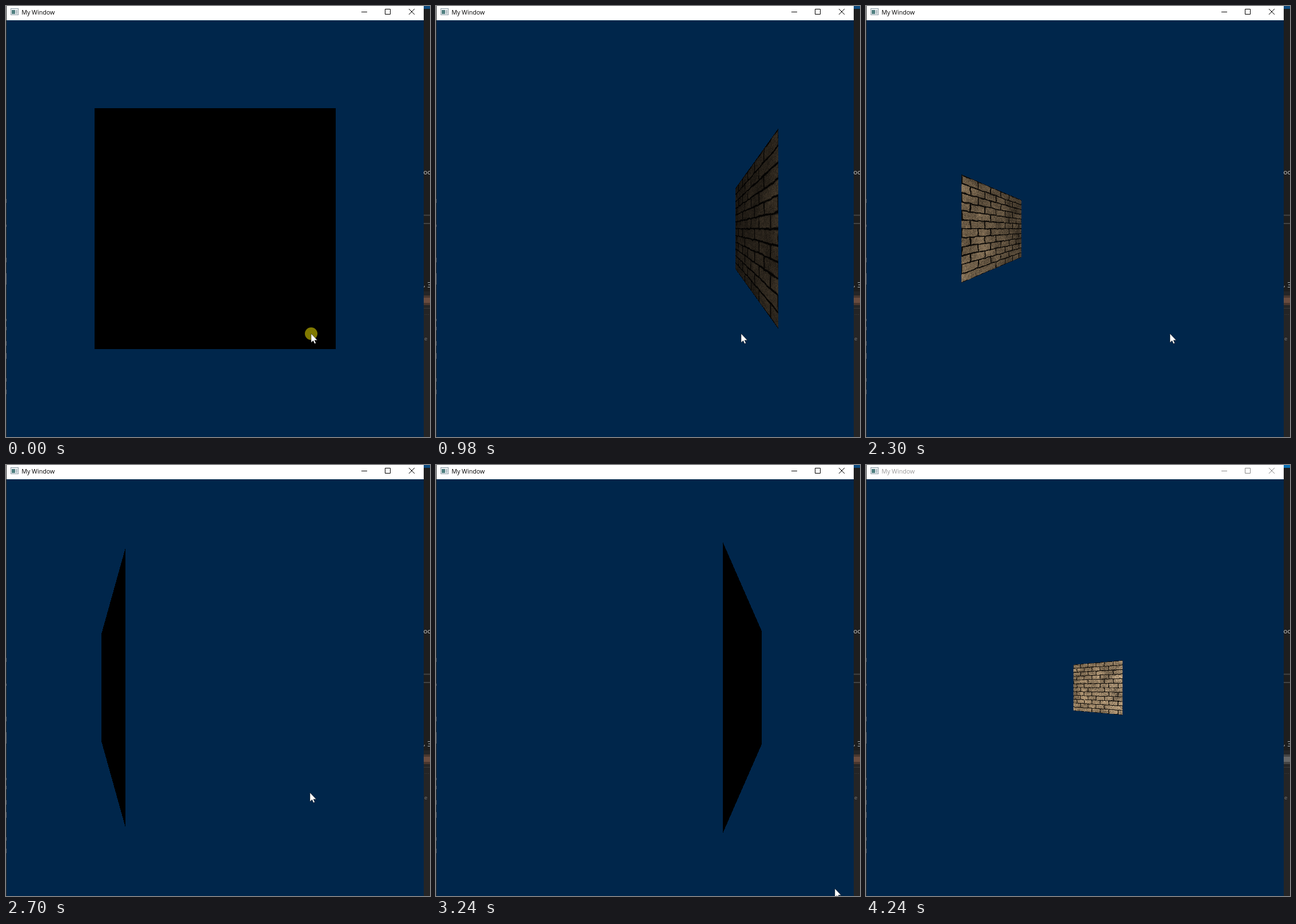
An HTML page with a canvas that plays this animation: 742 by 755 pixels, repeating every 4320 ms.

```html
<!DOCTYPE html>
<html lang="en">
<head>
<meta charset="utf-8">
<title>Rotating wall</title>
<style>
  html, body { margin: 0; width: 100%; height: 100%; overflow: hidden; background: #1e1e1e; }
  svg, canvas { position: absolute; left: 0; top: 0; width: 742px; height: 755px; display: block; }
  text { font-family: "Open Sans", "Noto Sans", sans-serif; }
</style>
</head>
<body>
<svg viewBox="0 0 742 755">
  <rect width="742" height="755" fill="#1e1e1e"/>
  <g id="desk">
    <rect id="deskTop" x="731" width="11" height="5"/>
    <text x="730.5" y="295" font-size="11.5" fill="#d0d0d0">oc</text>
    <path d="M731 366.5h11M731 381h11" stroke="#434343" stroke-width="2"/>
    <text x="731" y="492" font-size="11.5" fill="#c4c4c4">,</text>
    <path d="M738 484.5h4M739 488.5h3M738 492.5h4" stroke="#a8b0b4"/>
    <rect x="731" y="500" width="11" height="255" fill="#252526"/>
    <rect id="barOuter" x="731" y="507" width="11" height="17"/>
    <rect id="barInner" x="731" y="511" width="11" height="9"/>
    <path d="M731 529.5h11" stroke="#3a3a3a"/>
    <path d="M733 540.5h9" stroke="#444" stroke-dasharray="1 2"/>
    <text x="732" y="586" font-size="9.5" fill="#777">e</text>
  </g>
  <rect width="1" height="755" fill="#2a2b2d"/>
  <path d="M.5 338v7M.5 383v4M.5 441v8M.5 468v20M.5 548v4M.5 562v6M.5 587v8M.5 608v10M.5 652v6M.5 672v8" stroke="#66605a"/>
  <rect x="1" width="730" height="25" fill="#fff"/>
  <rect x="1" y="25" width="730" height="730" fill="#00264b"/>
  <g>
    <rect x="8.5" y="4.5" width="13" height="11" fill="#f4f7f8" stroke="#8c9ba5"/>
    <rect x="10" y="7" width="6" height="7" fill="#4f7f80"/>
    <rect x="17" y="7" width="3" height="7" fill="#b9c4cb"/>
  </g>
  <text id="title" x="27.3" y="14.6" font-size="10.7">My Window</text>
  <path id="buttons" fill="none" d="M622 10.5h10M663.5 5.5h9v9h-9zM705 5l10 10M715 5l-10 10"/>
</svg>
<canvas id="view" width="742" height="755"></canvas>
<svg viewBox="0 0 742 755">
  <circle id="click" cx="534" cy="574" r="11" fill="#fff200" fill-opacity=".5"/>
  <path id="cursor" d="M0 0V15.6L3.6 12.2L6 17.6L8.4 16.5L6 11.4H10.8Z" fill="#fff" stroke="#111" stroke-width=".5"/>
</svg>
<script>
const LOOP = 4320;
const CX = 366, CY = 390;
const FOCAL = 365 / Math.tan(Math.PI / 3);   // 120 degree field of view
const DIST = 3, ORBIT = 2;
const TEX = 384, ROWS = 12;

const $ = id => document.getElementById(id);
const ctx = $('view').getContext('2d');

// start ms, end ms, steps, first angle, last angle
const runs = [
  [0, 0, 1, 0, 0],
  [70, 70, 1, 2.5, 2.5],
  [200, 200, 1, 5.74, 5.74],
  [750, 1210, 7, 22.8, 103.2],
  [1290, 1760, 7, 114, 183.3],
  [1840, 2300, 7, 195, 263.7],
  [2390, 2860, 7, 274.3, 338.2],
  [2930, 3390, 7, 355.3, 423],
  [3460, 3640, 3, 435, 459],
  [3710, 3930, 4, 469, 498.4],
  [4010, 4090, 2, 507, 515.4]
];
const poses = runs.flatMap(([t0, t1, n, a0, a1]) =>
  Array.from({ length: n }, (_, i) => {
    const k = n > 1 ? i / (n - 1) : 0;
    return [Math.round((t0 + (t1 - t0) * k) / 10) * 10, a0 + (a1 - a0) * k];
  }));

const cursorPath = [
  [0, 534, 574], [1290, 533, 574], [1840, 532, 574], [2780, 531, 576],
  [2930, 529, 579], [3010, 528, 582], [3080, 560, 620], [3160, 630, 690],
  [3240, 698, 742], [3310, 760, 780]
];

const latest = (list, t) => list.findLast(e => e[0] <= t);

function hash(x, y) {
  let h = Math.imul(x, 374761393) + Math.imul(y, 668265263);
  h = Math.imul(h ^ (h >>> 13), 1274126177);
  return ((h ^ (h >>> 16)) >>> 0) / 4294967296;
}

function smoothNoise(x, y) {
  const i = Math.floor(x), j = Math.floor(y);
  const ease = v => v * v * (3 - 2 * v);
  const u = ease(x - i), v = ease(y - j);
  const top = hash(i, j) * (1 - u) + hash(i + 1, j) * u;
  const low = hash(i, j + 1) * (1 - u) + hash(i + 1, j + 1) * u;
  return top * (1 - v) + low * v;
}

// Brightness of the brick wall, 1 being plain stone
function makeWall() {
  const wall = new Float32Array(TEX * TEX);
  const h = TEX / ROWS, w = TEX / 6;
  for (let y = 0; y < TEX; y++) for (let x = 0; x < TEX; x++) {
    const wy = y + (smoothNoise(x / 14, y / 14 + 50) - .5) * 4;
    const row = Math.floor(wy / h);
    const wx = x + (row & 1 ? w / 2 : 0) + (smoothNoise(x / 14 + 90, y / 14) - .5) * 4;
    const col = Math.round(wx / w);
    const dy = Math.abs(wy - Math.round(wy / h) * h);
    const joint = hash(col + 31, row + 7) > .17;
    const dx = joint ? Math.abs(wx - col * w) : 99;
    const brick = hash(Math.floor(wx / w) + 5, row + 60);
    const gap = Math.min(dx, dy);
    let b = .72 + .14 * brick + .38 * smoothNoise(x / 42 + 3, y / 42)
          + .22 * (smoothNoise(x / 6, y / 6) - .5) + .42 * (hash(x, y) - .5);
    b += .1 * (y / TEX - x / TEX);
    if (gap < 1.9) b *= .13;
    else if (gap < 3.2) b *= .62;
    wall[y * TEX + x] = b;
  }
  return wall;
}
const wall = makeWall();

function drawWall(deg) {
  const s = Math.sin(deg * Math.PI / 180), c = Math.cos(deg * Math.PI / 180);
  const edge = a => {
    const z = DIST - ORBIT * c + a * s;
    return CX + FOCAL * (ORBIT * s + a * c) / z;
  };
  const xs = [edge(-1), edge(1)].sort((a, b) => a - b);
  const x0 = Math.round(xs[0]), x1 = Math.round(xs[1]);
  ctx.clearRect(0, 0, 742, 755);
  if (x1 <= x0) return;
  const top = 100, height = 580;
  const img = ctx.createImageData(x1 - x0, height), px = img.data;
  const facing = Math.max(0, ORBIT - DIST * c);   // plane distance to the lamp at the eye
  for (let x = x0; x < x1; x++) {
    const u = (x + .5 - CX) / FOCAL;
    const a = Math.max(-1, Math.min(1, (u * (DIST - ORBIT * c) - ORBIT * s) / (c - u * s)));
    const z = DIST - ORBIT * c + a * s, wx = ORBIT * s + a * c;
    const half = FOCAL / z;
    const tx = Math.min(TEX - 1, Math.floor((1 - a) / 2 * TEX));
    for (let y = Math.round(CY - half); y < Math.round(CY + half); y++) {
      const v = (y + .5 - CY) * z / FOCAL;
      const ty = Math.max(0, Math.min(TEX - 1, Math.floor((v + 1) / 2 * TEX)));
      const light = facing / Math.hypot(wx, v, z);
      const b = wall[ty * TEX + tx];
      const lit = light * b, shine = 18 * b * light ** 32;
      const i = ((y - top) * (x1 - x0) + x - x0) * 4;
      px[i] = 152 * lit + shine;
      px[i + 1] = 129 * lit + shine;
      px[i + 2] = 99 * lit + shine;
      px[i + 3] = 255;
    }
  }
  ctx.putImageData(img, x0, top);
}

let shown = null;
function render(t) {
  const angle = latest(poses, t)[1];
  if (angle !== shown) drawWall(shown = angle);

  const [, mx, my] = latest(cursorPath, t);
  $('cursor').setAttribute('transform', `translate(${mx} ${my})`);
  $('click').style.display = t < 70 ? '' : 'none';

  const active = t < 4240;
  $('title').setAttribute('fill', active ? '#000' : '#999');
  $('buttons').setAttribute('stroke', active ? '#000' : '#888');
  $('deskTop').setAttribute('fill', active ? '#0b4a80' : '#0a70b4');
  $('barOuter').setAttribute('fill', active ? '#49372f' : '#444');
  $('barInner').setAttribute('fill', active ? '#6a4c3f' : '#666');
}

const start = performance.now();
function tick() {
  render((performance.now() - start) % LOOP);
  requestAnimationFrame(tick);
}
tick();
</script>
</body>
</html>
```
